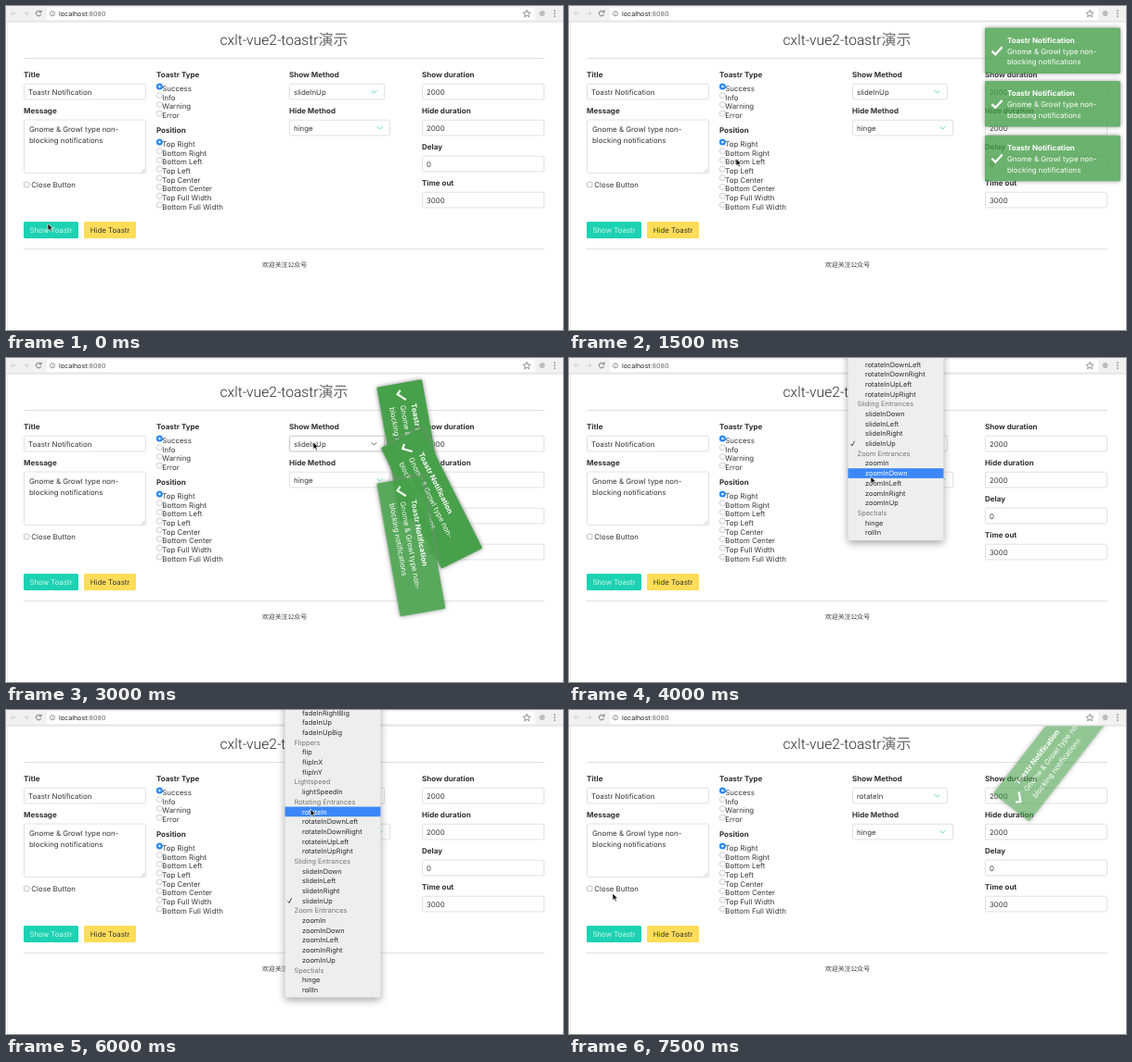
An HTML page for the animation above (8000 ms loop, 600 by 350 pixels).

```html
<!DOCTYPE html>
<html lang="en">
<head>
<meta charset="utf-8">
<title>Toastr demo</title>
<style>
html, body { margin: 0; width: 100%; height: 100%; overflow: hidden; background: #fff; }
svg { display: block; width: 600px; height: 350px; }
text { font: 7.87px Inter, "Noto Sans CJK SC", sans-serif; fill: #363636; white-space: pre; text-rendering: geometricPrecision; }
.b { font-size: 8px; font-weight: 700; fill: #303030; }
.menu { font-size: 7.4px; fill: #2d2d2d; }
.head { fill: #777; }
.white { fill: #fff; }
.pale { fill: #d5f5ee; }
.latin { font: 300 15.6px Roboto, sans-serif; fill: #2c2c2c; }
.cjk { font: 300 16px "Noto Sans CJK SC Light", "Noto Sans CJK SC", "Noto Sans CJK", sans-serif; fill: #666; }
.toast { filter: drop-shadow(0 0 2.5px #888); }
.popup { filter: drop-shadow(0 3px 4px rgba(0, 0, 0, .35)); }
</style>
</head>
<body>
<svg id="stage" viewBox="0 0 600 350"></svg>
<script>
const STEP = 500, LOOP = 8000, SPEED = 1.67;
const PITCH = 10.69;
const MENU = ['fadeInRightBig', 'fadeInUp', 'fadeInUpBig', '#Flippers', 'flip', 'flipInX', 'flipInY',
  '#Lightspeed', 'lightSpeedIn', '#Rotating Entrances', 'rotateIn', 'rotateInDownLeft',
  'rotateInDownRight', 'rotateInUpLeft', 'rotateInUpRight', '#Sliding Entrances', 'slideInDown',
  'slideInLeft', 'slideInRight', 'slideInUp', '#Zoom Entrances', 'zoomIn', 'zoomInDown',
  'zoomInLeft', 'zoomInRight', 'zoomInUp', '#Spectials', 'hinge', 'rollIn'];
// Pointer per step: x, y, 1 = hand
const POINTER = [[45, 235], [46, 238, 1], [46, 238, 1], [180, 165], [331, 89, 1], [331, 89, 1],
  [331, 91], [331, 91], [325, 128], [327, 128], [329, 23], [329, 64], [328, 107], [328, 107],
  [46, 238, 1], [47, 198]];

const bezier = (x1, y1, x2, y2) => x => {
  const at = (a, b, u) => 3 * a * u * (1 - u) ** 2 + 3 * b * u * u * (1 - u) + u ** 3;
  let lo = 0, hi = 1;
  for (let i = 0; i < 24; i++) {
    const mid = (lo + hi) / 2;
    if (at(x1, x2, mid) < x) lo = mid; else hi = mid;
  }
  return at(y1, y2, lo);
};
const ease = bezier(.25, .1, .25, 1), easeInOut = bezier(.42, 0, .58, 1);

// Text is placed by its vertical middle.
const text = (x, y, s, cls = '', extra = '') =>
  `<text x="${x}" y="${y + 2.8}" class="${cls}" ${extra}>${s}</text>`;
const rect = (x, y, w, h, fill, extra = '') =>
  `<rect x="${x}" y="${y}" width="${w}" height="${h}" fill="${fill}" ${extra}/>`;
const path = (d, stroke, width = 1, fill = 'none') =>
  `<path d="${d}" fill="${fill}" stroke="${stroke}" stroke-width="${width}"/>`;
const box = (x, y, w, h, stroke = '#dadada') =>
  rect(x + .5, y + .5, w - 1, h - 1, '#fff', `rx="1.5" stroke="${stroke}" stroke-width=".8"`);
const field = (x, y, label, value) =>
  text(x, y, label, 'b') + box(x, y + 9.7, 132, 17.7) + text(x + 5, y + 18.7, value);
const select = (y, w, label, value, active) =>
  text(305, y, label, 'b') + box(305, y + 9.7, w, 17.7, active ? '#b5b5b5' : undefined) +
  text(310, y + 18.7, value) +
  path(`M${305 + w - 14.3} ${y + 17.2}l2.8 2.8 2.8-2.8`, active ? '#444' : '#45d8bf', .9);
const radios = (y, names) => names.map((name, i) => {
  const cy = y - 2 + i * 9.7;
  return (i ? `<circle cx="165.4" cy="${cy}" r="3" fill="#fff" stroke="#b5b5b5" stroke-width=".7"/>`
    : `<circle cx="165.4" cy="${cy}" r="3.5" fill="#2f87f5"/><circle cx="165.4" cy="${cy}" r="1.2" fill="#fff"/>`) +
    text(168.3, y + i * 9.7, name);
}).join('');
const button = (x, w, fill, label, cls) =>
  rect(x, 233, w, 18, fill, 'rx="1.5"') +
  text(x + w / 2, 242, label, cls, 'text-anchor="middle"');

function page(method, active, pressed) {
  return rect(0, 0, 600, 350, '#fff') + path('M1.5 17V350', '#ececec') +
    `<text x="230.5" y="41.5" class="latin">cxlt-vue2-toastr<tspan class="cjk">演示</tspan></text>` +
    path('M19 56.5H580M19 262.5H580', '#e0e0e0') +
    field(19, 74, 'Title', 'Toastr Notification') +
    text(19, 113, 'Message', 'b') + box(19, 122.5, 132, 58.5) +
    text(25, 133.5, 'Gnome &amp; Growl type non-') + text(25, 145.5, 'blocking notifications') +
    path('M146 179.5l3.5-3.5M148 179.5l1.5-1.5', '#999', .6) +
    rect(19.5, 190.3, 5.4, 5.4, '#fff', 'rx="1" stroke="#aaa" stroke-width=".7"') +
    text(27.3, 192.8, 'Close Button') +
    text(162, 74, 'Toastr Type', 'b') + radios(89, ['Success', 'Info', 'Warning', 'Error']) +
    text(162, 134.3, 'Position', 'b') +
    radios(149, ['Top Right', 'Bottom Right', 'Bottom Left', 'Top Left', 'Top Center',
      'Bottom Center', 'Top Full Width', 'Bottom Full Width']) +
    select(74, 103, 'Show Method', method, active) + select(113, 109, 'Hide Method', 'hinge') +
    field(448, 74, 'Show duration', '2000') + field(448, 113, 'Hide duration', '2000') +
    field(448, 152, 'Delay', '0') + field(448, 191, 'Time out', '3000') +
    button(19, 59, pressed ? '#14bfa2' : '#1dd2b3', 'Show Toastr', 'pale') +
    button(84, 56, '#ffdd57', 'Hide Toastr') +
    text(300, 279.5, '欢迎关注公众号', '', 'text-anchor="middle" style="font-size:6.9px"');
}

function toolbar() {
  return rect(0, 0, 600, 17, '#f1f1f1') + path('M0 17H600', '#d2d2d2', .8) +
    rect(44, 1.5, 526, 13.5, '#fff', 'rx="2"') +
    path('M11 8H5.5M8 5.5L5.5 8 8 10.5M18.5 8H24M21.5 5.5L24 8l-2.5 2.5', '#c9c9c9', .9) +
    path('M37.5 6.5a2.8 2.8 0 1 0 .3 2.3M38 4.5v2.3h-2.3', '#666', .9) +
    '<circle cx="50" cy="8.2" r="2.6" fill="none" stroke="#777" stroke-width=".7"/>' +
    path('M50 7.8v2M50 6.4v.7', '#777', .7) +
    text(57, 8.2, 'localhost<tspan fill="#666">:8080</tspan>', '', 'style="font-size:7.15px;fill:#222"') +
    path('M561 4.4l1.1 2.5 2.7.3-2 1.8.6 2.7-2.4-1.4-2.4 1.4.6-2.7-2-1.8 2.7-.3z', '#666', .7) +
    '<circle cx="577.5" cy="8" r="3" fill="#bdbdbd"/>' +
    [5, 8, 11].map(y => `<circle cx="591" cy="${y}" r=".8" fill="#666"/>`).join('');
}

const toast = (transform, opacity) =>
  `<g transform="${transform}" opacity="${opacity}"><g class="toast">` +
  rect(0, 0, 146, 49.5, '#47a04a', 'rx="1.5"') + '</g>' +
  path('M7.5 25l3.8 3.8 7.4-8', '#fff', 2.2) +
  text(24, 13.5, 'Toastr Notification', 'b white') +
  text(24, 25.4, 'Gnome &amp; Growl type non-', 'white') +
  text(24, 37, 'blocking notifications', 'white') + '</g>';

// Slides up for 2 s, rests until 3 s, then swings on its corner and drops.
function slidingToast(age, y) {
  if (age < 0 || age >= 5000) return '';
  if (age < 3000)
    return toast(`translate(448 ${y + 49.5 * (1 - ease(Math.min(1, age / 2000)))})`, .8);
  const p = (age - 3000) / 2000, angles = [0, 80, 60, 80, 60, 0];
  const i = Math.floor(p * 5), k = easeInOut(p * 5 - i);
  const angle = angles[i] + (angles[i + 1] - angles[i]) * k;
  const drop = i === 4 ? k : 0;
  const opacity = p < .4 ? .8 + .2 * easeInOut(p / .4) : 1 - drop;
  return toast(`translate(448 ${y + 700 * drop}) rotate(${angle})`, opacity);
}

function rotatingToast(age) {
  if (age < 0) return '';
  const k = ease(Math.min(1, age / 2000));
  return toast(`translate(448 23) rotate(${-200 * (1 - k)} 73 24.75)`, .8 * k);
}

function menu(top, pointerY) {
  const hot = Math.floor((pointerY - top) / PITCH + .5);
  return rect(300.5, -20, 103, top + 28 * PITCH + 28.5, '#eee', 'rx="3" class="popup"') +
    MENU.map((name, i) => {
      const y = top + i * PITCH, head = name[0] === '#';
      const lit = i === hot && !head;
      return (lit ? rect(300.5, y - 5.2, 103, PITCH, '#3c87f7') : '') +
        (name === 'slideInUp' ? path(`M303.5 ${y + .5}l1.5 2 2.6-5`, lit ? '#fff' : '#333', .9) : '') +
        text(head ? 310.5 : 319, y, name.replace('#', ''),
          'menu' + (head ? ' head' : lit ? ' white' : ''));
    }).join('');
}

function pointer([x, y, hand]) {
  const d = hand
    ? 'M-1 0q1-1 1.8 0v3l3.2.8q1 .4.8 1.6l-.6 3.2h-4.6l-2.4-3.4q0-1.2 1.8-.2z'
    : 'M0 0v7.6l1.8-1.6 1.3 2.8 1.3-.6-1.3-2.7h2.5z';
  return `<g transform="translate(${x} ${y})">` +
    (hand ? path(d, '#222', .8, '#fff') : path(d, '#fff', .6, '#111')) + '</g>';
}

function draw(t) {
  const n = t / STEP, open = t >= 3500 && t < 6500;
  const age = 50 + (t - 500) * SPEED;
  const [, py] = POINTER[n];
  const pressed = n === 1 || n === 2 || n === 14;
  return page(t < 6500 ? 'slideInUp' : 'rotateIn', t >= 2000 && t < 3500, pressed) +
    [0, 540, 830].map((delay, i) => slidingToast(age - delay, 23 + 52 * i)).join('') +
    rotatingToast((t - 6970) * SPEED) + toolbar() +
    (open ? menu(t < 4500 ? -110.8 : 2.8, py) : '') + pointer(POINTER[n]);
}

const stage = document.getElementById('stage');
const start = performance.now();
let shown = -1;
function tick() {
  const t = Math.floor((performance.now() - start) % LOOP / STEP) * STEP;
  if (t !== shown) stage.innerHTML = draw(shown = t);
  requestAnimationFrame(tick);
}
tick();
</script>
</body>
</html>
```
